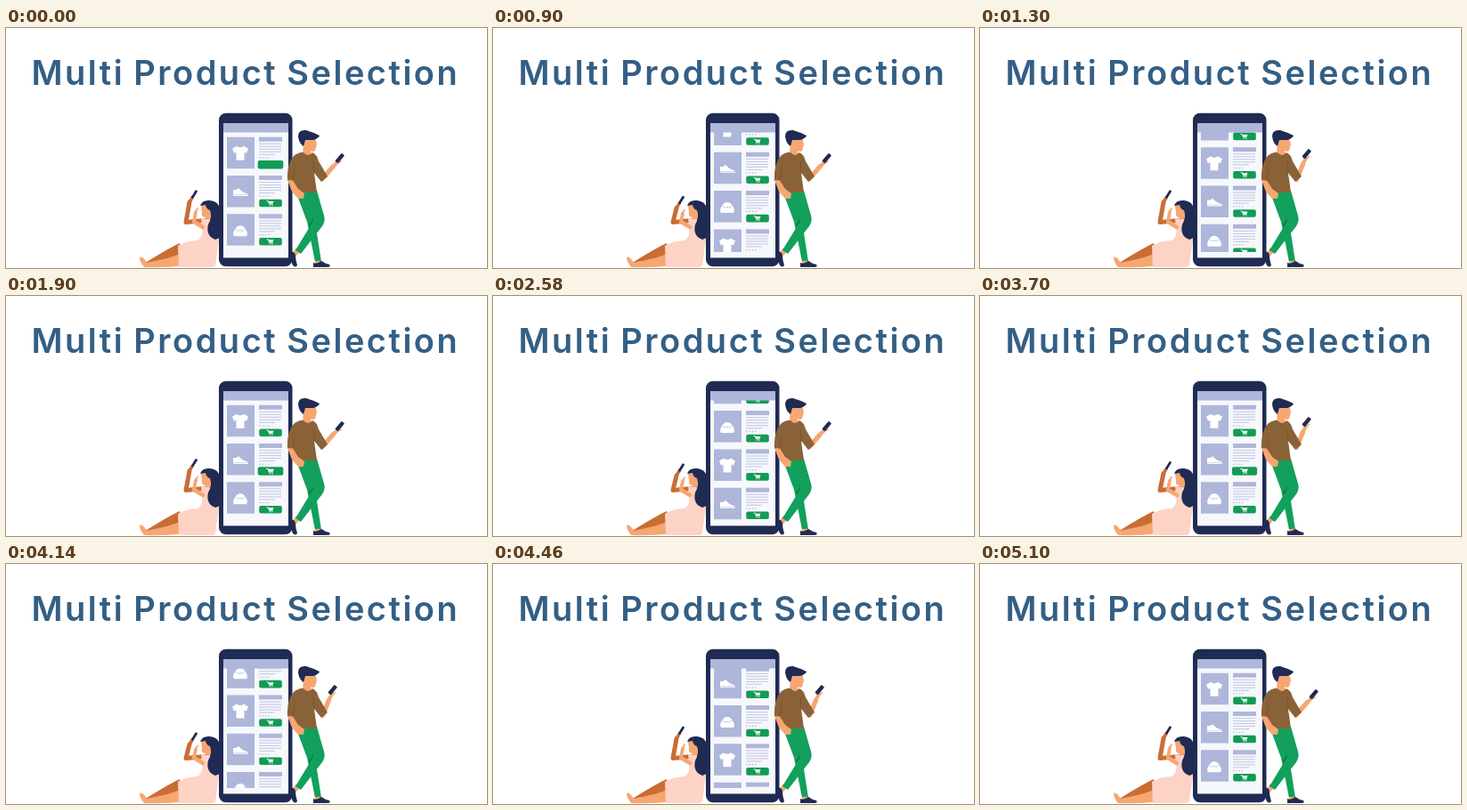
These frames come from a looping animation (540 by 270 pixels, 5140 ms). An HTML page with a canvas:

```html
<!DOCTYPE html>
<html lang="en">
<head>
<meta charset="utf-8">
<title>Multi Product Selection</title>
<style>
  html, body { margin: 0; width: 100%; height: 100%; overflow: hidden; background: #fff; }
  canvas { display: block; width: 540px; height: 270px; }
</style>
</head>
<body>
<canvas id="stage" width="540" height="270"></canvas>
<script>
const ctx = document.getElementById('stage').getContext('2d');
const NAVY = '#1f2b53', LILAC = '#aeb6da', GREEN = '#129b55', TROUSERS = '#12a05c', SHADE = '#0d7a48',
      SKIN = '#f6a671', BROWN = '#8a6238', DRESS = '#fdd3c5', TAN = '#c96d34';
const LOOP = 5140, CYCLE = 1642, PITCH = 43.3, STEP = 40, FIRST_HOLD = 140;
const SCROLL_START = 499, SCROLL_TIME = 807, SCROLLED_ITEMS = 15;

const clamp = v => Math.max(0, Math.min(1, v));
const easeInOut = (u, n) => u < 0.5 ? (2 * u) ** n / 2 : 1 - (2 - 2 * u) ** n / 2;
const smooth = u => (1 - Math.cos(Math.PI * u)) / 2;
const ramp = (t, from, to) => smooth(clamp((t - from) / (to - from)));

function rect(color, x, y, w, h, r = 0) {
  ctx.fillStyle = color;
  ctx.beginPath();
  ctx.roundRect(x, y, w, h, r);
  ctx.fill();
}

function shape(color, d) {
  ctx.fillStyle = color;
  ctx.fill(new Path2D(d));
}

function stroke(color, width, d) {
  ctx.strokeStyle = color;
  ctx.lineWidth = width;
  ctx.lineCap = ctx.lineJoin = 'round';
  ctx.stroke(new Path2D(d));
}

function at(x, y, angle, draw, scale = 1) {
  ctx.save();
  ctx.translate(x, y);
  ctx.rotate(angle);
  ctx.scale(scale, scale);
  draw();
  ctx.restore();
}

// Icons are drawn around the centre of their tile.
const icons = [
  () => shape('#fff', 'M-4-8 Q0-5 4-8 L9-5 L7 0 L4.5-1 V8 H-4.5 V-1 L-7 0 L-9-5 Z'),
  () => {
    shape('#fff', 'M-8-2 Q-4-1-2-4 Q2 1 7 2 Q9 3 9 5 H-8 Z');
    stroke(LILAC, 0.5, 'M-8 3.7 H8');
  },
  () => {
    shape('#fff', 'M-7 7 Q-9 4-6.5 0 Q-4-5 0-5 Q4-5 6.5 0 Q9 4 7 7 Z');
    stroke(LILAC, 0.8, 'M-5-1 Q-2.5 2.5 0 0 Q2.5 2.5 5-1');
  }
];

function cart() {
  stroke('#fff', 0.9, 'M-4-2.5 H-2.7 L-1.4 1 H2.2');
  shape('#fff', 'M-2.5-2 H3.5 L2.4 0.5 H-1.5 Z');
  rect('#fff', -1.5, 1.8, 1.3, 1.3, 0.65);
  rect('#fff', 1.2, 1.8, 1.3, 1.3, 0.65);
}

function product(index, y, press) {
  rect(LILAC, 248, y, 31, 35.5);
  at(263, y + 18, 0, icons[index]);
  rect(LILAC, 284, y, 26, 5);
  for (let i = 0; i < 5; i++) rect('#c6cce5', 284, y + 7 + i * 3, i === 4 ? 18 : 25, 1.2);
  for (let i = 0; i < 4; i++) rect('#b9c0df', 284 + i * 3.3, y + 22.5, 1.8, 1.6, 0.8);

  const pulse = clamp(10 * press * (1 - press));
  at(297, y + 31, 0, () => {
    rect(GREEN, -12.8, -4.3, 25.6, 8.6, 2);
    if (press < 0.6 || press > 0.85) cart();
  }, 1 + 0.12 * pulse);
}

// The three buttons are pressed one after another; the first press spans the cycle's seam.
function pressOf(index, phase) {
  return (phase + 190 - index * 270 + CYCLE) % CYCLE / 260;
}

function phone(phase) {
  rect(NAVY, 239, 95.7, 82.5, 172.6, 8);
  rect('#f7f8fc', 244, 107, 73, 151.5);
  ctx.save();
  ctx.beginPath();
  ctx.rect(244, 117, 73, 135);
  ctx.clip();
  const progress = easeInOut(clamp((phase - SCROLL_START) / SCROLL_TIME), 2.5);
  const scroll = SCROLLED_ITEMS * PITCH * progress % (3 * PITCH);
  const resting = progress < 0.05 || progress === 1;
  for (let i = 0; i < 6; i++) {
    product(i % 3, 122.7 + i * PITCH - scroll, resting ? clamp(pressOf(i % 3, phase)) : 1);
  }
  ctx.restore();
  rect(LILAC, 244, 107, 73, 10.5);
}

function woman(drop) {
  // Far leg, then near leg and feet
  shape(TAN, 'M195 242 Q184 247 163 260 L155 265 L160 268 Q180 264 198 255 Z');
  shape(SKIN, 'M202 252 L181 259 L158 264 Q153 256 150 258 Q150 263 155 269 Q177 270 203 267 Z');
  // Arm holding the phone
  const hand = 195 + drop;
  stroke(TAN, 5, `M229 216 L202 218.5 L206 ${hand + 1}`);
  stroke(TAN, 3.6, `M206 ${hand + 1} L209 ${hand - 4}`);
  at(211.5, hand - 8, 0.55, () => rect(NAVY, -1.4, -5, 2.8, 10, 0.9));
  // Face, dress and hair
  shape(SKIN, 'M219 200 Q223 194 230 197 L233 207 L229 216 L223 213 Q219 212 220 207 Z');
  shape(DRESS, 'M219 214 L228 215 Q237 224 239 238 L235 267 Q234 269 230 269 H194 L193 245 Q203 239 215 239 Q222 235 220 224 Z');
  shape(NAVY, 'M218 200 Q220 193 229 194 Q240 195 240 206 Q239 216 241 224 Q244 236 235 238 Q224 234 227 221 Q232 213 229 205 Q225 204 224 199 Z');
  const finger = 207 + drop * 0.2;
  stroke(SKIN, 4.5, 'M221 224 L211 218');
  stroke(SKIN, 3.8, `M211 218 L213 ${finger}`);
  stroke(SKIN, 1.8, `M213 ${finger} L215 ${finger - 4}`);
}

function man(raise) {
  // Standing leg, crossed leg and shoes
  shape(TROUSERS, 'M325 183 L344 183 L347 218 L354 263 H347 L338 218 Z');
  shape(SHADE, 'M340 186 L344 216 L340 221 L343 236 L350 228 L348 205 Z');
  shape(SKIN, 'M347 262 H354 V266 H347 Z M326 247 L330 252 L325 257 L321 254 Z');
  shape(NAVY, 'M345 264 Q349 266 354 262 Q358 265 363 266 Q365 269 361 269 H345 Z');
  shape(NAVY, 'M320 252 Q324 251 325 256 Q325 261 327 267 Q325 270 322 267 Q319 262 320 252 Z');
  shape(TROUSERS, 'M333 183 H349 L357 211 Q359 217 355 223 L331 254 L325 250 L345 217 Z');
  // Head
  shape(SKIN, 'M334 123 L347 122 L349 131 L347 138 Q345 140 342 138 L344 146 L333 144 Z');
  shape(NAVY, 'M328 122 Q328 114 337 115 Q344 117 352 121 Q351 124 345 126 L336 126 L334 133 Q329 130 328 122 Z');
  // The forearm turns around the elbow while the phone keeps its tilt
  const swing = -0.33 * raise;
  at(356, 168, swing, () => {
    stroke(SKIN, 5.2, 'M-1 2 L11-12');
    stroke(SKIN, 4, 'M11-12 L16-17');
    stroke(SKIN, 1.8, 'M15-15 L20-18');
    at(18.7, -21.5, 0.7 - swing, () => rect(NAVY, -2.2, -5.8, 4.4, 11.6, 1));
  });
  // Jumper and sleeves
  shape(BROWN, 'M324 143 Q331 139 334 140 Q339 146 344 140 Q349 142 351 150 L361 167 L354 173 L346 163 L349 185 H323 L322 173 L316 172 Q315 152 324 143 Z');
  stroke('#74502b', 0.7, 'M345 150 L346 163 M324 157 L322 173');
  // Hand in the pocket
  shape(SKIN, 'M316 171 L322 171.5 L328 181 L335 186 L334 192 L328 192 L321 184 Z');
}

function title() {
  ctx.font = '600 38px Inter, "Open Sans", sans-serif';
  ctx.letterSpacing = '2.5px';
  ctx.wordSpacing = '-2px';
  ctx.fillStyle = '#345f85';
  ctx.fillText('Multi Product Selection', 28.5, 64);
}

const womanDrop = phase => 7 * (ramp(phase, 60, 560) - ramp(phase, 740, 1130));
const manRaise = t =>
  ramp(t, 940, 1220) - ramp(t, 1280, 1700) + ramp(t, 2980, 3440) - ramp(t, 4640, 5060);

function render(now) {
  const raw = now % LOOP;
  const t = raw < FIRST_HOLD ? STEP + FIRST_HOLD - 2 * STEP
    : FIRST_HOLD + Math.floor((raw - FIRST_HOLD) / STEP) * STEP;
  // The opening pose is held, so the cycles run 100 ms behind.
  const phase = (t - (FIRST_HOLD - STEP)) % CYCLE;
  ctx.fillStyle = '#fff';
  ctx.fillRect(0, 0, 540, 270);
  title();
  woman(womanDrop(phase));
  phone(phase);
  man(manRaise(t));
}

const start = performance.now();
function tick() {
  render(performance.now() - start);
  requestAnimationFrame(tick);
}
tick();
</script>
</body>
</html>
```
